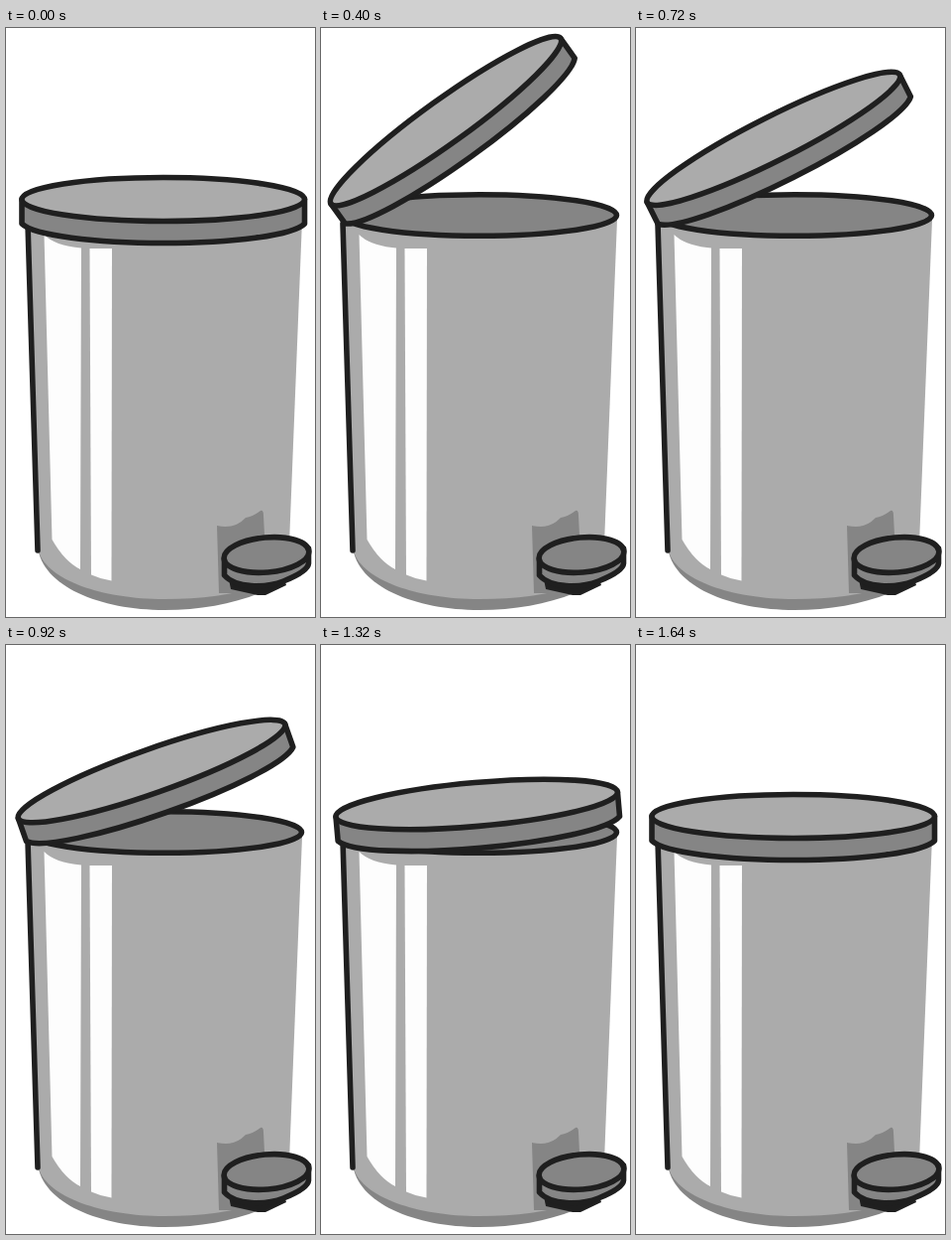
An HTML page that plays this animation: 312 px wide and 593 px high, repeating every 2160 ms.

```html
<!DOCTYPE html>
<html lang="en">
<head>
<meta charset="utf-8">
<title>Pedal bin</title>
<style>
  html, body { margin: 0; width: 100%; height: 100%; overflow: hidden; background: #fff; }
  svg { display: block; width: 100vw; height: 100vh; }
  .line { stroke: #1f1f1f; stroke-width: 5.6; stroke-linejoin: round; stroke-linecap: round; }
  .light { fill: #ababab; }
  .dark { fill: #858585; }
  .shine { fill: #fdfdfd; }
</style>
</head>
<body>
<svg viewBox="0 0 312 593">
  <!-- body -->
  <path class="dark" d="M32 522 C36 562 95 586 160 586 C195 586 228 580 256 569 L256 520Z"/>
  <path class="light" d="M21 193 H299 L285 545 C268 564 215 575 160 575 C97 575 42 556 33 527Z"/>
  <path class="shine" d="M38.500 208 Q49 219 76 221.500 L75 545 Q59 537 46.500 515Z"/>
  <path class="shine" d="M84.500 222 H107 L106.500 556.500 Q96 555 86 550.500Z"/>
  <path class="line" fill="none" d="M22 197 L32 526"/>
  <path class="dark" d="M213 501 Q231 505 242 493 Q249 492 257 486 Q260 485 260 491 L262 530 L240 569 L215 569Z"/>

  <!-- opening -->
  <ellipse class="dark line" cx="160" cy="188.500" rx="138.500" ry="20.800"/>

  <!-- pedal -->
  <path fill="#1f1f1f" d="M225 555 H281 L283 561 L262 571 H254 L227 565Z"/>
  <g id="pedal">
    <path class="dark line" d="M220.500 534 V551 C232 564 262 564 280 557 Q305 547 305.500 539 V524Z"/>
    <ellipse class="dark line" cx="263" cy="530.500" rx="43" ry="17.500" transform="rotate(-5 263 530.500)"/>
  </g>

  <!-- lid -->
  <g id="lid">
    <path class="dark line" d="M16 172.500 V197 C28 209 90 216.500 159 216.500 S290 209 301.500 197 V172.500Z"/>
    <ellipse class="light line" cx="158.750" cy="172.500" rx="142.750" ry="22"/>
  </g>
</svg>
<script>
  const LOOP = 2160, STEP = 40;
  const lid = document.getElementById('lid');
  const pedal = document.getElementById('pedal');

  // [time in ms, value]
  const lidAngle = [
    [0, 0], [40, 5.5], [160, 27.2], [240, 35.8], [280, 37.2], [400, 35.7], [560, 32.4],
    [720, 26.7], [920, 19.4], [1120, 11.8], [1320, 5], [1480, 1.6], [1640, 0], [LOOP, 0]
  ];
  const pedalLift = [[0, 0], [160, 8], [320, 0], [LOOP, 0]];

  // Smooth curve through the keys, flat at peaks and rests.
  function sample(keys, t) {
    const i = Math.max(1, keys.findIndex(k => k[0] > t));
    const rate = n => (keys[n][1] - keys[n - 1][1]) / (keys[n][0] - keys[n - 1][0]);
    const slope = n => {
      if (n < 1 || n >= keys.length - 1) return 0;
      const a = rate(n), b = rate(n + 1);
      return a * b > 0 ? 2 * a * b / (a + b) : 0;
    };
    const [t0, v0] = keys[i - 1], [t1, v1] = keys[i];
    const d = t1 - t0, u = (t - t0) / d, w = 1 - u;
    return v0 * w * w * (1 + 2 * u) + v1 * u * u * (3 - 2 * u)
      + d * u * w * (slope(i - 1) * w - slope(i) * u);
  }

  const start = performance.now();
  function draw() {
    const elapsed = Math.max(0, performance.now() - start) % LOOP;
    const t = Math.floor(elapsed / STEP) * STEP;
    lid.setAttribute('transform', `rotate(${-sample(lidAngle, t)} 20 184)`);
    pedal.setAttribute('transform', `translate(0 ${-sample(pedalLift, t)})`);
    requestAnimationFrame(draw);
  }
  draw();
</script>
</body>
</html>
```
